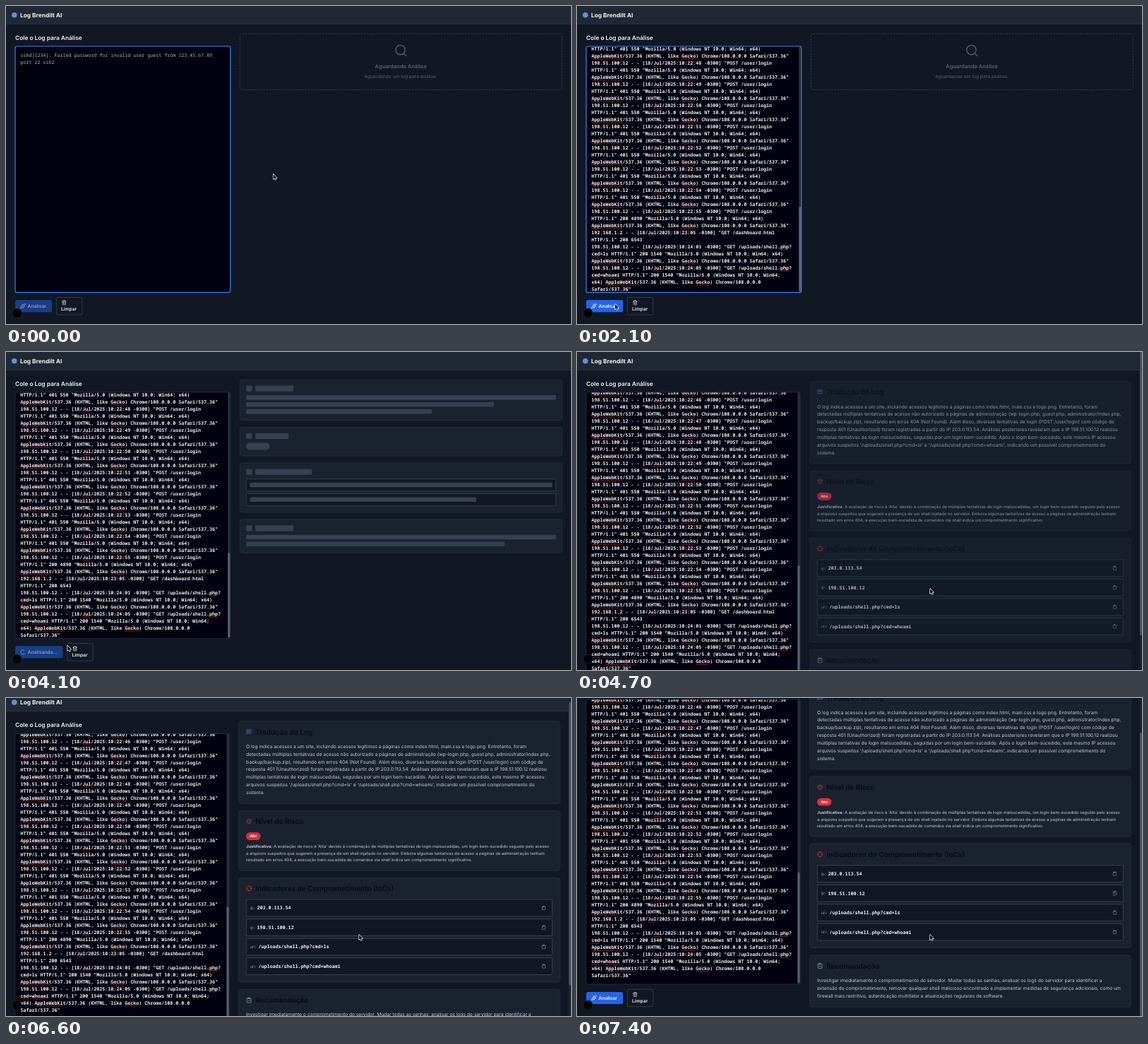
Animation, 800 px wide and 450 px high, one loop 7.5 s. Source, as an HTML page with a canvas:

```html
<!DOCTYPE html>
<html lang="pt-BR">
<head>
<meta charset="utf-8">
<title>Log Brendilt AI</title>
<style>
html, body { margin: 0; width: 100%; height: 100%; overflow: hidden; background: #111824; }
canvas { display: block; width: 800px; height: 450px; }
</style>
</head>
<body>
<canvas id="stage" width="800" height="450"></canvas>
<script>
const ctx = document.getElementById("stage").getContext("2d");
const LOOP = 7500, STEP = 100;
const PASTE = 900, SPELL = 1500, CLICK = 2200, RESULT = 4480;
const SCROLL_START = 6435, SCROLL_END = 7200, SCROLL_MAX = 55;
const GROWTH = 54.8;
const SANS = "Inter, sans-serif", MONO = "'Noto Sans Mono', monospace";
const C = {
  page: "#111824", header: "#1f2833", card: "#1a222f", edge: "#27313f",
  field: "#02010f", line: "#374151", bar: "#374151", blue: "#2563eb",
  focus: "#3b82f6", red: "#dc2f3f", text: "#eceff3", body: "#c6ccd4",
  muted: "#9ca3af", dim: "#596270", heading: "#070b13"
};

// Log shown in the text field, already wrapped
const AGENT = 'AppleWebKit/537.36 (KHTML, like Gecko) Chrome/108.0.0.0';
const WINDOWS = '"Mozilla/5.0 (Windows NT 10.0; Win64;';
const entry = (ip, time, request) => `${ip} - - [18/Jul/2025:10:${time} -0300] "${request}`;
const attacker = "198.51.100.12";
const log = [];
for (let s = 44; s <= 55; s++) {
  log.push(entry(attacker, "22:" + s, "POST /user/login"),
    `HTTP/1.1" ${s < 55 ? "401 550" : "200 4890"} ${WINDOWS} x64)`,
    AGENT + ' Safari/537.36"');
}
log.push(entry("192.168.1.2", "23:05", "GET /dashboard.html"), 'HTTP/1.1" 200 6543',
  entry(attacker, "24:01", "GET /uploads/shell.php?"),
  `cmd=ls HTTP/1.1" 200 1540 ${WINDOWS} x64)`, AGENT + ' Safari/537.36"',
  entry(attacker, "24:05", "GET /uploads/shell.php?"),
  `cmd=whoami HTTP/1.1" 200 1540 ${WINDOWS}`, "x64) " + AGENT, 'Safari/537.36"');

const summary = [
  "O log indica acessos a um site, incluindo acessos legítimos a páginas como index.html, main.css e logo.png. Entretanto, foram",
  "detectadas múltiplas tentativas de acesso não autorizado a páginas de administração (wp-login.php, guest.php, administrator/index.php,",
  "backup/backup.zip), resultando em erros 404 (Not Found). Além disso, diversas tentativas de login (POST /user/login) com código de",
  "resposta 401 (Unauthorized) foram registradas a partir do IP 203.0.113.54. Análises posteriores revelaram que o IP 198.51.100.12 realizou",
  "múltiplas tentativas de login malsucedidas, seguidas por um login bem-sucedido. Após o login bem-sucedido, este mesmo IP acessou",
  "arquivos suspeitos '/uploads/shell.php?cmd=ls' e '/uploads/shell.php?cmd=whoami', indicando um possível comprometimento do",
  "sistema."
];
const reason = [
  " A avaliação de risco é 'Alta' devido à combinação de múltiplas tentativas de login malsucedidas, um login bem-sucedido seguido pelo acesso",
  "a arquivos suspeitos que sugerem a presença de um shell injetado no servidor. Embora algumas tentativas de acesso a páginas de administração tenham",
  "resultado em erros 404, a execução bem-sucedida de comandos via shell indica um comprometimento significativo."
];
const advice = [
  "Investigar imediatamente o comprometimento do servidor. Mudar todas as senhas, analisar os logs do servidor para identificar a",
  "extensão do comprometimento, remover qualquer shell malicioso encontrado e implementar medidas de segurança adicionais, como um",
  "firewall mais restritivo, autenticação multifator e atualizações regulares de software."
];
const indicators = [["ip:", "203.0.113.54"], ["ip:", "198.51.100.12"],
  ["uri:", "/uploads/shell.php?cmd=ls"], ["uri:", "/uploads/shell.php?cmd=whoami"]];

// Icons on a 24-unit grid
const CLIP = "M9 2h6v4H9zM15 4h3a2 2 0 0 1 2 2v14a2 2 0 0 1-2 2H6a2 2 0 0 1-2-2V6a2 2 0 0 1 2-2h3";
const ICON = {
  search: "M19 11a8 8 0 1 1-16 0a8 8 0 1 1 16 0M21 21l-4.35-4.35",
  sparkle: "M12 4l2 6 6 2-6 2-2 6-2-6-6-2 6-2zM20 2v5M22.5 4.5h-5M4 17v4M6 19H2",
  trash: "M3 6h18M19 6v14a2 2 0 0 1-2 2H7a2 2 0 0 1-2-2V6M8 6V4a2 2 0 0 1 2-2h4a2 2 0 0 1 2 2v2M10 11v6M14 11v6",
  message: "M21 15a2 2 0 0 1-2 2H7l-4 4V5a2 2 0 0 1 2-2h14a2 2 0 0 1 2 2zM8 8v4M8 8h3M14 8v4M14 8h3",
  shield: "M20 13c0 5-3.5 7.5-8 9-4.5-1.5-8-4-8-9V6c3 0 6-1.5 8-3.5 2 2 5 3.5 8 3.5zM12 8v4M12 16h.01",
  target: "M22 12a10 10 0 1 1-20 0a10 10 0 1 1 20 0M22 12h-4M6 12H2M12 6V2M12 22v-4",
  clip: CLIP,
  check: CLIP + "M9 14l2 2 4-4"
};

const clamp = v => Math.max(0, Math.min(1, v));
const smooth = v => { v = clamp(v); return v * v * (3 - 2 * v); };
const mix = (a, b, u) => a + (b - a) * u;

function text(str, x, y, size, color, weight = 400, family = SANS, align = "left") {
  ctx.font = `${weight} ${size}px ${family}`;
  ctx.textAlign = align;
  ctx.fillStyle = color;
  ctx.fillText(str, x, y + size * 0.35);
}

function box(x, y, x2, y2, r, fill, stroke, width = 0.8) {
  ctx.beginPath();
  ctx.roundRect(x, y, x2 - x, y2 - y, r);
  if (fill) { ctx.fillStyle = fill; ctx.fill(); }
  if (stroke) { ctx.strokeStyle = stroke; ctx.lineWidth = width; ctx.stroke(); }
}

function dot(x, y, r, color) {
  ctx.beginPath();
  ctx.arc(x, y, r, 0, Math.PI * 2);
  ctx.fillStyle = color;
  ctx.fill();
}

function icon(name, cx, cy, size, color) {
  ctx.save();
  ctx.translate(cx - size / 2, cy - size / 2);
  ctx.scale(size / 24, size / 24);
  ctx.lineWidth = 2;
  ctx.lineCap = ctx.lineJoin = "round";
  ctx.strokeStyle = color;
  ctx.stroke(new Path2D(ICON[name]));
  ctx.restore();
}

function drawHeader(right) {
  ctx.fillStyle = C.header;
  ctx.fillRect(0, 0, right, 25.3);
  ctx.fillStyle = C.line;
  ctx.fillRect(0, 25.1, right, 0.6);
  dot(11.8, 12.7, 3.8, "#5b93dc");
  text("Log Brendilt AI", 20, 12.7, 8.33, "#f3f4f6", 700);
}

function squiggle(x, y, width) {
  ctx.beginPath();
  for (let i = 0; i <= width; i++) ctx.lineTo(x + i, y + (i % 2 ? 0.45 : -0.45));
  ctx.strokeStyle = "#d3222f";
  ctx.lineWidth = 0.8;
  ctx.stroke();
}

function drawLog(lastY, spellAll) {
  log.forEach((line, i) => {
    const y = lastY - 10 * (log.length - 1 - i);
    text(line, 20.5, y, 6.67, C.text, 600, MONO);
    if (!spellAll && i < log.length - 4) return;
    const cell = ctx.measureText("0").width;
    for (const m of line.matchAll(/AppleWebKit|Gecko|Jul|php|cmd|whoami/g)) {
      if (!spellAll && /Apple|Jul/.test(m[0])) continue;
      squiggle(20.5 + m.index * cell, y + 4, m[0].length * cell);
    }
  });
}

function drawField(t, done) {
  const right = done ? 316 : 317.7;
  const bottom = done ? 460 : 405.4;
  const pasted = t >= PASTE, focused = t < CLICK;
  text("Cole o Log para Análise", 13, 44.7, 8.33, "#f3f4f6", 600);
  box(13, 57, right, bottom, 2.5, C.field);
  ctx.save();
  ctx.beginPath();
  ctx.roundRect(13, 57, right - 13, bottom - 57, 2.5);
  ctx.clip();
  if (pasted) {
    drawLog(done ? 448 : 400.7, t >= SPELL);
    ctx.fillStyle = "#262d39";
    ctx.fillRect(right - 3.7, 57, 3.7, bottom - 57);
    box(right - 3.5, done ? 302 : 284, right - 0.4, bottom - 2, 1.5, "#566274");
  } else {
    text("sshd[1234]: Failed password for invalid user guest from 123.45.67.89", 20.5, 70, 6.67, "#b0b6c0", 500, MONO);
    text("port 22 ssh2", 20.5, 80, 6.67, "#b0b6c0", 500, MONO);
  }
  ctx.restore();
  box(13, 57, right, bottom, 2.5, null, focused ? C.focus : C.edge, focused ? 1.2 : 0.8);
}

function drawButtons(t, done) {
  const y = done ? 424.7 + GROWTH : 424.7;
  const busy = t >= CLICK && !done;
  const shift = busy ? 15.4 : 0;
  ctx.save();
  if (busy || t < PASTE) ctx.globalAlpha = 0.5;
  box(13, y - 8.6, 65 + shift, y + 8.6, 2.5, C.blue);
  if (busy) {
    const a = t / 1000 * Math.PI * 2;
    ctx.beginPath();
    ctx.arc(24, y, 3.1, a, a + 4.9);
    ctx.strokeStyle = "#fff";
    ctx.lineWidth = 0.8;
    ctx.stroke();
  } else icon("sparkle", 24, y, 8.3, "#fff");
  text(busy ? "Analisando..." : "Analisar", 30.6, y, 6.67, "#fff", 600);
  ctx.restore();
  box(71.3 + shift, y - 12.3, 107.8 + shift, y + 12.3, 2.5, "#111824", "#3d4653");
  icon("trash", 82.2 + shift, y - 5, 7.4, C.text);
  text("Limpar", 78 + shift, y + 4, 6.67, C.text, 600);
}

function drawWaiting() {
  ctx.setLineDash([2.5, 1.7]);
  box(331.2, 39.3, 787.3, 118.6, 3.3, null, "#374151", 0.9);
  ctx.setLineDash([]);
  icon("search", 559.2, 63, 20, "#4b5563");
  text("Aguardando Análise", 559, 85.6, 7.5, C.dim, 600, SANS, "center");
  text("Aguardando um log para análise.", 559, 99.8, 6.67, C.dim, 400, SANS, "center");
}

function drawSkeleton(t) {
  const cards = [[39.2, 96.5, 54], [106.5, 147.2, 47], [157.2, 226.8, 80], [236.8, 284.2, 54]];
  for (const [top, bottom] of cards) box(331.2, top, 787.4, bottom, 3.3, C.card, C.edge);
  box(340.2, 179.8, 778.5, 196.8, 0.5, C.page, C.line);
  box(340.2, 200.6, 778.5, 217.6, 0.5, C.page, C.line);
  ctx.save();
  ctx.globalAlpha = 0.75 + 0.25 * Math.cos((t - CLICK) / 1000 * Math.PI);
  const bar = (x, y, x2, h = 6.5, r = 1.6) => box(x, y, x2, y + h, r, C.bar);
  for (const [top, , width] of cards) {
    bar(340, top + 8.4, 348.5, 8.2);
    bar(353, top + 8.4, 353 + width, 8.2);
  }
  bar(340, 61, 778.8); bar(340, 71, 691); bar(340, 81, 603);
  bar(340, 128.4, 373.5, 10, 5);
  bar(345.3, 184.8, 773.5); bar(345.3, 205.6, 666);
  bar(340, 258.8, 778.8); bar(340, 268.6, 706);
  ctx.restore();
}

function drawCard(top, bottom, name, color, title) {
  box(329.7, top, 784.3, bottom, 3.3, C.card, C.edge);
  icon(name, 344, top + 15.1, 8.4, color);
  text(title, 353.2, top + 15.2, 10, C.heading, 600);
}

function paragraph(lines, y) {
  lines.forEach((line, i) => text(line, 340, y + i * 10.83, 6.67, C.body));
}

function drawResults(t) {
  const u = clamp((t - RESULT) / 500);
  const ease = 1 - Math.pow(1 - u, 2);
  ctx.save();
  ctx.globalAlpha = ease;
  ctx.translate(0, (1 - ease) * 6.7);

  drawCard(39.5, 156, "message", "#3b82f6", "Tradução do Log");
  paragraph(summary, 75.2);

  drawCard(166, 251, "shield", "#e5484d", "Nível de Risco");
  box(340, 196.7, 360.4, 207.6, 5.4, C.red);
  text("Alto", 350.2, 202.2, 5, "#fff", 700, SANS, "center");
  const label = "Justificativa:";
  text(label, 340, 217, 5.83, C.body, 700);
  const indent = ctx.measureText(label).width;
  reason.forEach((line, i) => text(line, i ? 340 : 340 + indent, 217 + i * 9.48, 5.83, C.body));

  drawCard(261, 408.5, "target", "#d9363e", "Indicadores de Comprometimento (IoCs)");
  indicators.forEach(([kind, value], i) => {
    const y = 303.7 + i * 27.5;
    box(340.2, y - 11.9, 773.3, y + 11.9, 0.8, "#111824", "#3f4957");
    text(kind, 345.5, y, 5.83, "#8b94a1");
    text(value, 345.5 + ctx.measureText(kind).width + 3.3, y, 6.67, C.text, 600, MONO);
    icon("clip", 761.4, y, 6.4, C.muted);
  });

  drawCard(419, 492, "check", C.muted, "Recomendação");
  paragraph(advice, 454.6);
  ctx.restore();
}

const route = [[300, 378.5, 238], [800, 280, 345], [1300, 280, 345], [1900, 54, 422],
  [4000, 54, 422], [4600, 500, 335]];

function cursorAt(t) {
  if (t <= route[0][0]) return route[0].slice(1);
  for (let i = 1; i < route.length; i++) {
    const [t0, x0, y0] = route[i - 1], [t1, x1, y1] = route[i];
    if (t <= t1) {
      const u = smooth((t - t0) / (t1 - t0));
      return [mix(x0, x1, u), mix(y0, y1, u)];
    }
  }
  return route[route.length - 1].slice(1);
}

function drawCursor(t) {
  const [x, y] = cursorAt(t);
  ctx.save();
  ctx.translate(x, y);
  ctx.lineJoin = "round";
  if (t < RESULT && x > 13 && x < 317 && y > 57 && y < 405) {
    ctx.strokeStyle = "#d7dbe0";
    ctx.lineWidth = 0.9;
    ctx.stroke(new Path2D("M-2-4.5Q0-4.5 0-3.5Q0-4.5 2-4.5M0-3.5V3.5M-2 4.5Q0 4.5 0 3.5Q0 4.5 2 4.5"));
  } else if (t >= CLICK && y > 415 && x < 81) {
    ctx.strokeStyle = "#b5a99c";
    ctx.lineWidth = 1.1;
    ctx.stroke(new Path2D("M3.4 0a3.4 3.4 0 1 1-6.8 0a3.4 3.4 0 1 1 6.8 0M-2.4-2.4L2.4 2.4"));
  } else {
    const arrow = new Path2D("M0 0V7L1.6 5.6L2.7 8L3.9 7.5L2.8 5.1H5Z");
    ctx.strokeStyle = "#fff";
    ctx.lineWidth = 1.3;
    ctx.stroke(arrow);
    ctx.fillStyle = "#080808";
    ctx.fill(arrow);
  }
  ctx.restore();
}

function draw(t) {
  const done = t >= RESULT;
  const scroll = SCROLL_MAX * smooth((t - SCROLL_START) / (SCROLL_END - SCROLL_START));
  ctx.textRendering = "geometricPrecision";
  ctx.fillStyle = C.page;
  ctx.fillRect(0, 0, 800, 450);
  ctx.save();
  ctx.translate(0, -scroll);
  drawHeader(done ? 796.5 : 800);
  drawField(t, done);
  drawButtons(t, done);
  if (done) drawResults(t);
  else if (t >= CLICK) drawSkeleton(t);
  else drawWaiting();
  ctx.restore();
  if (done) {
    ctx.fillStyle = "#1b2330";
    ctx.fillRect(796.6, 0, 3.4, 450);
    const top = scroll * 450 / 505;
    box(797, top, 799.8, top + 401, 1.4, "#4b5563");
  }
  dot(15.6, 434.6, 7, "#2b2f36");
  dot(15.6, 434.6, 6.4, "#030303");
  drawCursor(t);
}

function tick() {
  draw(Math.floor(performance.now() % LOOP / STEP) * STEP);
  requestAnimationFrame(tick);
}
tick();
</script>
</body>
</html>
```
